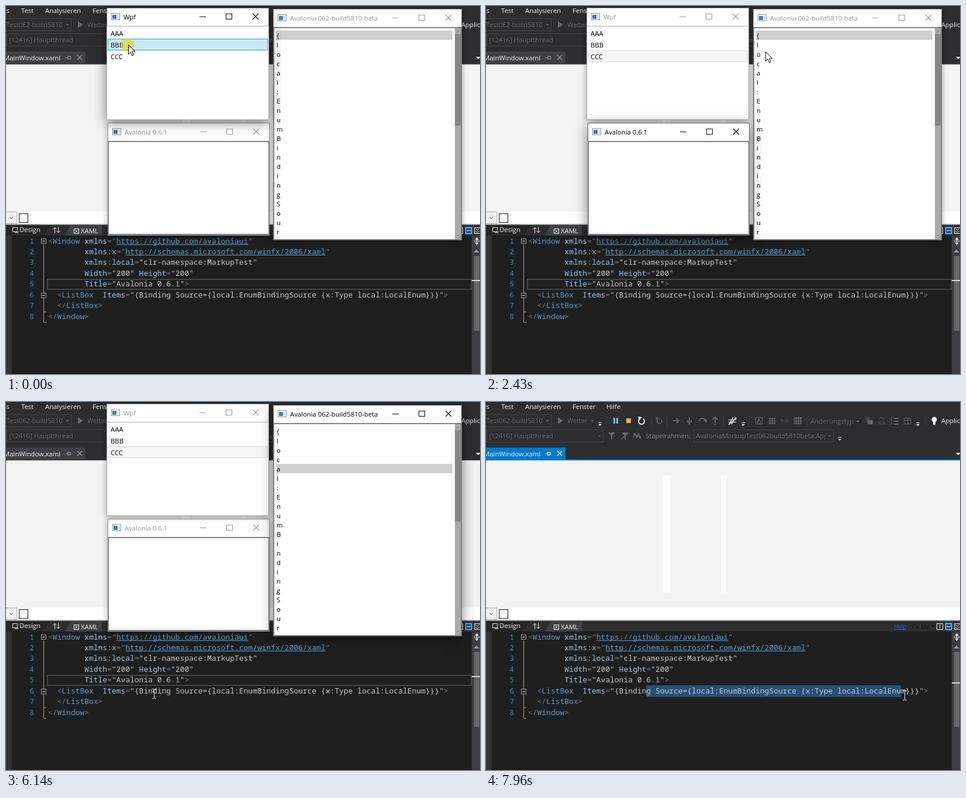
An HTML page with a canvas for the animation above (8000 ms loop, 811x630 px).

```html
<!DOCTYPE html>
<html lang="de">
<head>
<meta charset="utf-8">
<title>ListBox binding demo</title>
<style>
html, body { margin: 0; width: 811px; height: 630px; overflow: hidden; background: #2d2d30; }
canvas { display: block; }
</style>
</head>
<body>
<canvas id="stage" width="811" height="630"></canvas>
<script>
const ctx = document.getElementById('stage').getContext('2d');
const LOOP = 8000, STEP = 66;
const UI = '"Open Sans", "Noto Sans", sans-serif';
const MONO = '"Noto Sans Mono", "DejaVu Sans Mono", monospace';
const CHAR = 7.78, CODE_X = 72;
const DIM = '#656568', LIGHT = '#f1f1f1';

// ---------- timing ----------
// spans in which the pointer moves: start, end
const bursts = [[50, 320], [570, 780], [960, 1670], [1800, 1930], [2100, 2880], [2950, 3590],
  [3890, 4670], [4740, 4740], [4920, 5700], [5770, 5770], [6020, 6800], [6870, 7580]];
// pointer keys: time, x, y
const keys = [[0, 209, 66], [50, 209, 70], [182, 209, 84], [504, 209, 84], [780, 211, 127],
  [894, 211, 127], [1356, 228, 268], [1488, 228, 268], [1670, 197, 323], [1734, 197, 323],
  [1930, 198, 235], [2034, 198, 235], [2430, 478, 78], [2628, 471, 62], [2884, 471, 62],
  [3082, 471, 82], [3214, 471, 82], [3346, 470, 107], [3824, 470, 107], [4670, 474, 246],
  [4740, 475, 258], [4854, 475, 258], [5052, 352, 426], [5382, 256, 480], [5700, 240, 499],
  [5770, 239, 499], [5954, 239, 499], [6350, 281, 499], [6416, 282, 499], [6800, 449, 500],
  [7580, 716, 502]];
const presses = [[0, 50], [182, 314], [1356, 1488], [2628, 2760], [3082, 3214], [3478, 3590], [6350, 7960]];

function snap(t) {
  let s = 0;
  for (const [a, b] of bursts) {
    if (t >= a) s = Math.min(b, a + STEP * Math.floor((t - a) / STEP));
  }
  return s;
}

function pointerAt(t) {
  const i = keys.findIndex(k => k[0] > t);
  if (i < 0) return keys[keys.length - 1].slice(1);
  const [t0, x0, y0] = keys[i - 1], [t1, x1, y1] = keys[i];
  const p = (t - t0) / (t1 - t0);
  return [Math.round(x0 + (x1 - x0) * p), Math.round(y0 + (y1 - y0) * p)];
}

// ---------- drawing helpers ----------
function box(x, y, w, h, color) {
  ctx.fillStyle = color;
  ctx.fillRect(x, y, w, h);
}

function frame(x, y, w, h, color, lw = 1) {
  ctx.strokeStyle = color;
  ctx.lineWidth = lw;
  ctx.strokeRect(x + lw / 2, y + lw / 2, w - lw, h - lw);
}

function trace(pts) {
  ctx.beginPath();
  for (let i = 0; i < pts.length; i += 2) ctx.lineTo(pts[i], pts[i + 1]);
}

function line(color, pts, lw = 1) {
  trace(pts);
  ctx.strokeStyle = color;
  ctx.lineWidth = lw;
  ctx.stroke();
}

function poly(color, pts) {
  trace(pts);
  ctx.fillStyle = color;
  ctx.fill();
}

function arc(color, x, y, r, a, b, lw = 1.5) {
  ctx.beginPath();
  ctx.arc(x, y, r, a, b);
  ctx.strokeStyle = color;
  ctx.lineWidth = lw;
  ctx.stroke();
}

function text(s, x, y, color, size = 11.3, align = 'left', family = UI) {
  ctx.font = size + 'px ' + family;
  ctx.textAlign = align;
  ctx.fillStyle = color;
  ctx.fillText(s, x, y);
}

const down = (x, y, color, r = 3) => poly(color, [x - r, y, x + r, y, x, y + r]);

function overflow(x, y) {
  box(x - 3, y - 3, 6, 1, LIGHT);
  down(x, y, LIGHT);
}

function grip(x) {
  for (let i = 0; i < 4; i++) {
    box(x, 24 + i * 4, 1, 1, '#55555a');
    box(x + 3, 26 + i * 4, 1, 1, '#55555a');
  }
}

// ---------- IDE ----------
function arrowIcon(x, y, dx, dy) {
  line(DIM, [x - dx * 5, y - dy * 5, x + dx * 5, y + dy * 5], 2);
  line(DIM, [x + dx - dy * 4, y + dy - dx * 4, x + dx * 5, y + dy * 5, x + dx + dy * 4, y + dy + dx * 4], 2);
}

function gridIcon(x, y) {
  for (let i = 0; i < 9; i++) box(x - 5 + i % 3 * 4, y - 5 + Math.floor(i / 3) * 4, 3, 3, DIM);
}

function funnel(x, y) {
  poly(DIM, [x - 6, y - 6, x + 6, y - 6, x + 1, y, x + 1, y + 6, x - 1, y + 6, x - 1, y]);
}

function toolbars() {
  text('Extras', 6, 12, LIGHT, 11.3, 'right');
  [['Test', 26], ['Analysieren', 67], ['Fenster', 148], ['Hilfe', 206]].forEach(([s, x]) => text(s, x, 12, LIGHT));

  frame(-2, 21, 114, 22, '#434346');
  text('MarkupTest062-build5810', 97, 36, DIM, 11.3, 'right');
  down(105, 31, DIM);
  poly(DIM, [123, 26, 132, 32, 123, 38]);
  text('Weiter', 139, 36, DIM);
  down(182, 31, DIM);
  overflow(195, 38);
  grip(204);
  box(218, 27, 3, 10, '#75beff');
  box(223, 27, 3, 10, '#75beff');
  box(240, 28, 8, 8, '#f0b04a');
  arc(LIGHT, 266, 33, 5, -1, 4, 2);
  poly(LIGHT, [260, 25, 267, 26, 262, 31]);
  for (const x of [283, 309, 406, 548]) box(x, 22, 1, 20, '#414145');
  arc(DIM, 297, 33, 4, -1, 4);
  poly(DIM, [290, 26, 296, 27, 292, 31]);
  arrowIcon(325, 32, 1, 0);
  arrowIcon(348, 31, 0, 1);
  arrowIcon(392, 31, 0, -1);
  box(347, 37, 2, 2, DIM);
  box(391, 37, 2, 2, DIM);
  arc(DIM, 370, 33, 5, 3.2, 6.2, 2);
  poly(DIM, [372, 32, 378, 28, 377, 35]);
  for (const d of [-2, 2]) {
    line(LIGHT, [418 + d, 38, 425 + d, 26], 1.3);
    line(LIGHT, [415, 32.5 + d, 428, 32.5 + d], 1);
  }
  line(LIGHT, [415, 39, 429, 27], 1.2);
  overflow(440, 38);
  grip(450);
  frame(461, 26, 12, 12, DIM);
  line(DIM, [464, 36, 467, 29, 470, 36], 1.5);
  gridIcon(489, 32);
  text('SQL', 511, 34, DIM, 8, 'center');
  frame(527, 26, 13, 12, DIM);
  gridIcon(534, 32);
  text('Änderungstyp', 555, 37, DIM);
  down(636, 32, DIM);
  for (const y of [26.5, 29.5, 32.5]) line(DIM, [649, y, 656, y]);
  box(653, 31, 9, 7, DIM);
  text('SQL', 677, 38, DIM, 8, 'center');
  line(DIM, [672, 30, 676, 26, 681, 30]);
  for (let i = 0; i < 3; i++) box(698, 27 + i * 5, 8, 2, DIM);
  line(DIM, [696, 26, 693.5, 26, 693.5, 38, 696, 38]);
  frame(715, 27, 12, 11, DIM);
  line(DIM, [715, 31.5, 727, 31.5]);
  line(DIM, [721.5, 27, 721.5, 38]);
  overflow(739, 38);
  grip(749);
  ctx.beginPath();
  ctx.arc(767, 30, 4.5, 0, 7);
  ctx.fillStyle = LIGHT;
  ctx.fill();
  box(765, 34, 4, 5, LIGHT);
  text('Application', 779, 36, LIGHT);

  frame(1, 47, 200, 22, '#434346');
  text('[12416] Hauptthread', 5, 62, '#6c6c70');
  down(194, 57, DIM, 2.5);
  funnel(215, 58);
  funnel(238, 58);
  line(DIM, [231, 64, 243, 53], 1.5);
  line(DIM, [252, 61, 255, 54, 258, 61, 261, 54, 265, 61], 1.5);
  line(DIM, [252, 54, 266, 62], 1.5);
  text('Stapelrahmen:', 273, 62, '#858588');
  frame(355, 47, 240, 22, '#434346');
  ctx.save();
  ctx.beginPath();
  ctx.rect(356, 48, 224, 20);
  ctx.clip();
  text('AvaloniaMarkupTest062build5810beta.App', 359, 62, '#6c6c70');
  ctx.restore();
  down(588, 57, DIM, 2.5);
  overflow(605, 63);
}

function designer(focused) {
  const accent = focused ? '#007acc' : '#3f3f46';
  box(0, 78, 136, 20, accent);
  box(0, 98, 811, 2, accent);
  text('MainWindow.xaml', 93, 93, LIGHT, 11.3, 'right');
  const mark = focused ? '#ffffff' : '#98989c';
  line(mark, [102.5, 88.5, 105.5, 88.5, 105.5, 85]);
  line(mark, [105.5, 88, 105.5, 92]);
  frame(105, 86, 6, 5, mark);
  line(mark, [122, 84, 130, 92], 1.3);
  line(mark, [130, 84, 122, 92], 1.3);
  down(808, 87, LIGHT, 4);

  box(0, 100, 811, 252, '#f2f3f3');
  box(302, 126, 14, 200, '#fff');
  box(402, 126, 9, 200, '#fff');
  box(0, 352, 811, 22, '#fff');
  box(0, 352, 18, 21, '#f0f0f0');
  frame(-1, 352, 20, 21, '#acacac');
  line('#555', [6, 361, 9, 364, 12, 361]);
  frame(22, 355, 16, 16, '#111');
  box(0, 373, 811, 1, '#b0b0b0');
}

function tabStrip() {
  box(0, 374, 811, 19, '#2d2d30');
  box(0, 374, 811, 1, '#8d8d8d');
  poly('#252526', [0, 375, 75, 375, 65, 393, 0, 393]);
  frame(11, 379, 9, 8, LIGHT);
  line(LIGHT, [15, 388, 21, 388]);
  text('Design', 23, 387, LIGHT);
  line(LIGHT, [83.5, 389, 83.5, 379]);
  line(LIGHT, [80.5, 382, 83.5, 379, 86.5, 382]);
  line(LIGHT, [89.5, 378, 89.5, 388]);
  line(LIGHT, [86.5, 385, 89.5, 388, 92.5, 385]);
  poly('#3f3f46', [100, 393, 110, 376, 164, 376, 164, 393]);
  frame(116, 381, 9, 9, LIGHT);
  line(LIGHT, [118, 383, 123, 388]);
  line(LIGHT, [123, 383, 118, 388]);
  text('XAML', 128, 389, LIGHT);
  text('Help', 698, 388, '#2b62d0', 9.9);
  box(698, 389, 21, 1, '#2b62d0');
  text('Fix Me', 729, 388, '#111', 9.9);
  down(765, 382, '#111', 4);
  frame(771, 379, 11, 11, LIGHT);
  box(776, 381, 1, 7, LIGHT);
  box(785, 377, 14, 15, '#1c4f7c');
  frame(786, 379, 11, 11, '#bfe0ff');
  box(788, 384, 7, 1, '#fff');
  frame(801, 379, 11, 11, LIGHT);
  line(LIGHT, [803, 381, 806.5, 384, 810, 381]);
  line(LIGHT, [803, 385, 806.5, 388, 810, 385]);
}

// colour keys: p punctuation, t tag, a attribute, v value, l link
const ink = { p: '#808080', t: '#569cd6', a: '#92caf4', v: '#c8c8c8', l: '#569cd6' };
const code = [
  [0, 'p<', 'tWindow', 'a xmlns', 'p="', 'lhttps://github.com/avaloniaui', 'p"'],
  [8, 'axmlns:x', 'p="', 'lhttp://schemas.microsoft.com/winfx/2006/xaml', 'p"'],
  [8, 'axmlns:local', 'p=', 'v"clr-namespace:MarkupTest"'],
  [8, 'aWidth', 'p=', 'v"200"', 'a Height', 'p=', 'v"200"'],
  [8, 'aTitle', 'p=', 'v"Avalonia 0.6.1"', 'p>'],
  [2, 'p<', 'tListBox', 'a  Items', 'p=', 'v"{Binding Source={local:EnumBindingSource {x:Type local:LocalEnum}}}"', 'p>'],
  [2, 'p</', 'tListBox', 'p>'],
  [0, 'p</', 'tWindow', 'p>']
];

function editor(t, px) {
  const clicked = t >= 6350, selecting = t >= 6482;
  box(0, 393, 811, 237, '#1e1e1e');
  box(0, 393, 10, 237, '#333337');

  if (selecting) {
    const end = CODE_X + CHAR * Math.floor((px - CODE_X) / CHAR);
    box(274, 485, end - 274, 20, '#264f78');
  } else {
    frame(70, clicked ? 486 : 467, 727, 19, '#464646', 2);
  }

  line('#a5a5a5', [64.5, 408, 64.5, 541.5, 69, 541.5]);
  line('#a5a5a5', [64, 523.5, 69, 523.5]);
  for (const y of [398, 491]) {
    box(60, y, 9, 9, '#1e1e1e');
    frame(60, y, 9, 9, '#a5a5a5');
    box(62, y + 4, 5, 1, '#e0e0e0');
  }

  code.forEach(([col, ...parts], i) => {
    const y = Math.round(406.55 + 18.45 * i);
    text(i + 1, 48, y, '#2b91af', 12.97, 'right', MONO);
    for (const part of parts) {
      const s = part.slice(1), x = CODE_X + col * CHAR;
      text(s, x, y, ink[part[0]], 12.97, 'left', MONO);
      if (part[0] === 'l') box(x, y + 1, s.length * CHAR, 1, ink.l);
      col += s.length;
    }
  });
  if (clicked && !selecting) box(274, 487, 1, 16, '#dcdcdc');

  box(797, 393, 14, 237, '#3e3e42');
  line(LIGHT, [800, 402.5, 811, 402.5]);
  line(LIGHT, [805.5, 397, 805.5, 409]);
  poly(LIGHT, [802, 400, 805.5, 396, 809, 400]);
  down(805.5, 405, LIGHT, 3.5);
  poly('#999', [800, 422, 805, 417, 810, 422]);
  box(801, 428, 9, 128, '#686868');
  box(797, clicked ? 480 : 469, 14, 2, '#dcdcdc');
}

// ---------- windows ----------
function windowFrame(x, y, w, h, title, active) {
  ctx.save();
  ctx.shadowColor = active ? 'rgba(0,0,0,.5)' : 'rgba(0,0,0,.35)';
  ctx.shadowBlur = active ? 20 : 10;
  ctx.shadowOffsetY = active ? 4 : 2;
  box(x, y, w, h, '#fff');
  ctx.restore();
  frame(x, y, w, h, active ? '#66666a' : '#a0a0a0');
  const ty = y + 15;

  frame(x + 8, ty - 6, 15, 12, '#8a8f94');
  box(x + 10, ty - 3, 7, 7, '#3c7fa5');
  box(x + 18, ty - 3, 3, 7, '#dcdcdc');

  const color = active ? '#000' : '#999', r = x + w;
  text(title, x + 29, ty + 4.5, color);
  box(r - 119, ty, 11, 1, color);
  frame(r - 74, ty - 5, 11, 10, color);
  line(color, [r - 28, ty - 5, r - 18, ty + 5], 1.1);
  line(color, [r - 18, ty - 5, r - 28, ty + 5], 1.1);
}

function wpfWindow(active, selected) {
  windowFrame(172, 3, 278, 192, 'Wpf', active);
  frame(172, 34, 278, 161, '#abadb3');
  const y = 56 + 20 * (selected - 1);
  box(174, y, 274, 20, active ? '#cbe8f6' : '#f6f6f6');
  frame(174, y, 274, 20, active ? '#26a0da' : '#dadada');
  ['AAA', 'BBB', 'CCC'].forEach((s, i) => text(s, 179, 51 + 20 * i, '#000'));
}

function avaloniaWindow(active) {
  windowFrame(174, 200, 277, 193, 'Avalonia 0.6.1', active);
  frame(174, 231, 277, 161, '#828282', 2);
}

function betaWindow(active, row) {
  windowFrame(457, 5, 323, 396, 'Avalonia 062-build5810-beta', active);
  frame(457, 36, 323, 365, '#828282', 2);
  box(462, 42 + 16 * row, 302, 16, '#d0d0d0');
  [...'{local:EnumBindingSour'].forEach((c, i) => text(c, 463, 54.5 + 16 * i, '#000'));
  box(768, 38, 10, 361, '#aaa');
  box(768, 48, 10, 157, '#868686');
  line('#777', [770, 45, 773, 42, 776, 45]);
  line('#777', [770, 391, 773, 394, 776, 391]);
}

// ---------- pointer ----------
function pointer(t, x, y) {
  const beam = y > 393;
  if (presses.some(([a, b]) => t >= a && t < b)) {
    ctx.beginPath();
    ctx.arc(x - 1.5, y + (beam ? -0.5 : 1), 11.5, 0, 7);
    ctx.fillStyle = 'rgba(228,214,30,.66)';
    ctx.fill();
  }
  if (beam) {
    box(x, y - 7, 1, 15, '#e6e6e6');
    for (const dy of [-8, 8]) {
      box(x - 3, y + dy, 3, 1, '#e6e6e6');
      box(x + 1, y + dy, 3, 1, '#e6e6e6');
    }
    return;
  }
  const shape = [0, 0, 0, 16, 3.7, 12.5, 6.3, 18.5, 8.8, 17.5, 6.3, 11.5, 11.3, 11.3];
  ctx.save();
  ctx.translate(x + 0.5, y + 0.5);
  poly('#fff', shape);
  ctx.closePath();
  ctx.strokeStyle = '#000';
  ctx.lineWidth = 1;
  ctx.stroke();
  ctx.restore();
}

function draw(now) {
  const t = now % LOOP;
  const [x, y] = pointerAt(snap(t));
  const front = t < 1356 ? 'wpf' : t < 2628 ? 'ava' : t < 6350 ? 'beta' : 'ide';
  const row = t < 2628 ? 0 : t < 3082 ? 1 : t < 3478 ? 2 : 4;

  box(0, 0, 811, 630, '#2d2d30');
  toolbars();
  designer(front === 'ide');
  tabStrip();
  editor(t, x);
  if (front !== 'ide') {
    const windows = {
      ava: () => avaloniaWindow(front === 'ava'),
      beta: () => betaWindow(front === 'beta', row),
      wpf: () => wpfWindow(front === 'wpf', t < 182 ? 1 : 2)
    };
    for (const id in windows) if (id !== front) windows[id]();
    windows[front]();
  }
  pointer(t, x, y);
}

const start = performance.now();
function tick() {
  draw(performance.now() - start);
  requestAnimationFrame(tick);
}
tick();
</script>
</body>
</html>
```
